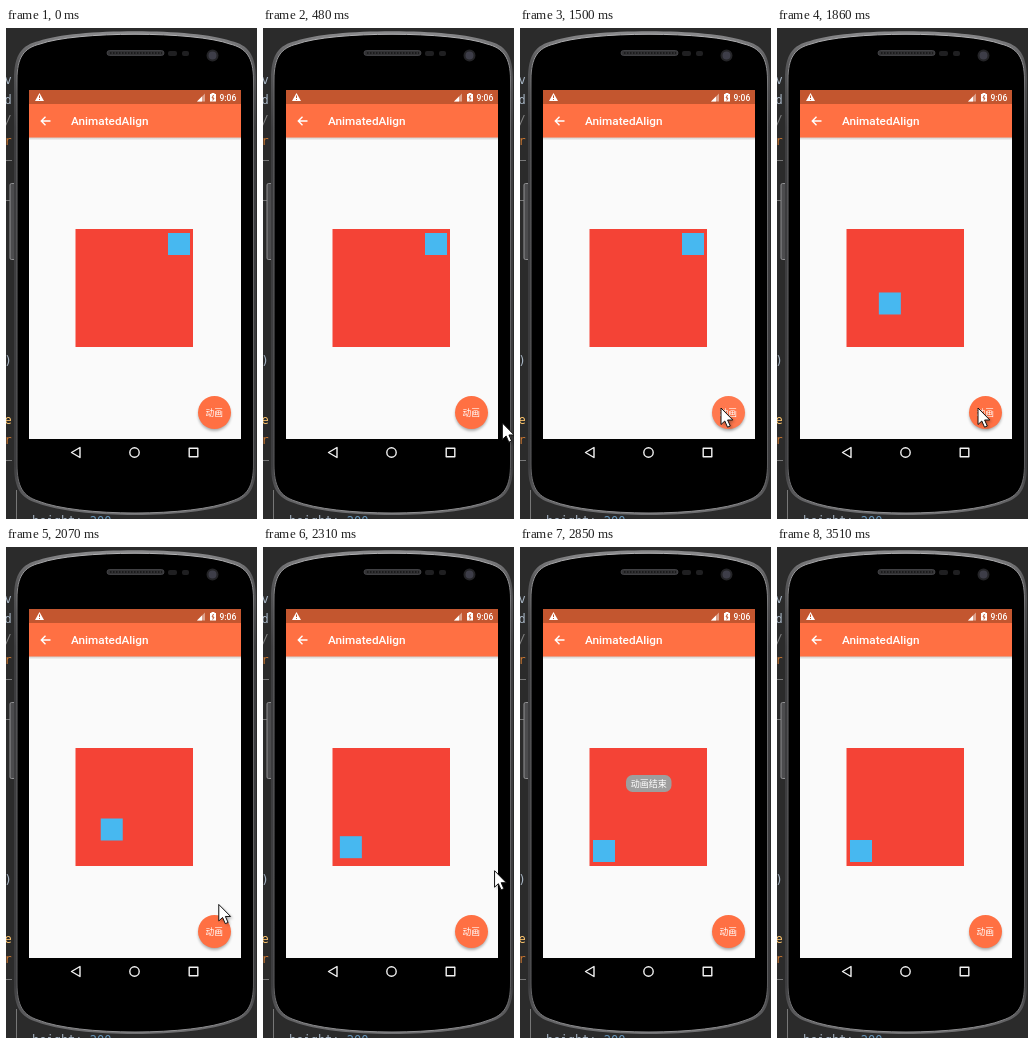
Recreate the animation shown at these times as an HTML page. Size 251 by 491 pixels, loop 3750 ms.

```html
<!DOCTYPE html>
<html lang="zh">
<head>
<meta charset="utf-8">
<title>AnimatedAlign</title>
<style>
  html, body { margin: 0; height: 100%; overflow: hidden; background: #2b2b2b; }
  svg { display: block; width: 100vw; height: 100vh; }
  .code { font: 12px "DejaVu Sans Mono", monospace; }
  .ui { font-family: Roboto, sans-serif; fill: #fff; }
  .cjk { font-family: "Noto Sans CJK SC", "Noto Sans CJK", sans-serif; fill: #fff; text-anchor: middle; }
</style>
</head>
<body>
<svg viewBox="0 0 251 491">
  <defs>
    <linearGradient id="rim" x2="0" y2="1">
      <stop stop-color="#8c8c8e"/><stop offset=".06" stop-color="#58585a"/>
      <stop offset=".2" stop-color="#3c3c3e"/><stop offset=".9" stop-color="#3c3c3e"/>
      <stop offset="1" stop-color="#707072"/>
    </linearGradient>
    <linearGradient id="edge" x2="0" y2="1">
      <stop stop-color="#b4b4b6"/><stop offset=".12" stop-color="#6c6c6e"/>
      <stop offset=".9" stop-color="#5c5c5e"/><stop offset="1" stop-color="#909092"/>
    </linearGradient>
    <linearGradient id="shade" x2="0" y2="1">
      <stop stop-opacity=".2"/><stop offset="1" stop-opacity="0"/>
    </linearGradient>
    <filter id="soft" x="-50%" y="-50%" width="200%" height="200%"><feGaussianBlur stdDeviation="1.5"/></filter>
  </defs>

  <!-- editor behind the phone -->
  <rect width="251" height="491" fill="#2b2b2b"/>
  <g class="code" fill="#a9b7c6">
    <text x="-1.500" y="56">v</text><text x="-1.500" y="76">d</text>
    <text x="-1.500" y="96" fill="#808080">/</text>
    <text x="-1.500" y="117" fill="#cc7832">r</text>
    <text x="-1.500" y="337">)</text>
    <text x="-1.500" y="396" fill="#ffc66d">e</text>
    <text x="-1.500" y="416" fill="#cc7832">r</text>
    <text x="26" y="496.500">height: <tspan fill="#6897bb">200</tspan></text>
  </g>
  <path d="M0 132.500H6M0 172.500H6M0 432.500H6M10.500 462V491" stroke="#777" fill="none"/>

  <!-- phone -->
  <rect x="4" y="155.500" width="6" height="76" rx="1.500" fill="#4c4c4e" stroke="#909092"/>
  <path d="M8 52C8 26 16 17 33 13C70 0 188 0 225 13C242 17 250 26 250 52V436C250 461 243 470 227 475C186 491 72 491 31 475C15 470 8 461 8 436Z" fill="url(#rim)"/>
  <path d="M11 52C11 29 18 20 34 16C70 3 188 3 224 16C240 20 247.500 29 247.500 52V436C247.500 459 241 468 226 473C186 489 72 489 32 473C17 468 11 459 11 436Z" fill="#000" stroke="url(#edge)"/>
  <rect x="101" y="22.500" width="57" height="5" rx="2.500" fill="#323234" stroke="#505053" stroke-width=".7"/>
  <path d="M104 25H156" stroke="#151515" stroke-width="1.500" stroke-dasharray="1.500 1.500"/>
  <rect x="162" y="23" width="9" height="5" rx="2" fill="#1f1f21"/>
  <rect x="176" y="23" width="7" height="5" rx="2" fill="#1f1f21"/>
  <circle cx="206.500" cy="27.500" r="5" fill="#3d3d48" stroke="#242427" stroke-width="2"/>

  <!-- screen -->
  <rect x="23" y="62" width="212" height="374" fill="#000"/>
  <rect x="23" y="76" width="212" height="335" fill="#fafafa"/>
  <rect x="23" y="109" width="212" height="3.500" fill="url(#shade)"/>
  <rect x="23" y="62" width="212" height="14.500" fill="#c3562f"/>
  <rect x="23" y="76" width="212" height="33.500" fill="#ff7043"/>
  <path d="M33.500 65L38 73H29Z" fill="#fff"/>
  <path d="M33.500 67.500V70M33.500 71V72" stroke="#c3562f"/>
  <path d="M191 73.500L199 65.500V73.500Z" fill="#fff" opacity=".45"/>
  <path d="M191 73.500L196 68.500V73.500Z" fill="#fff"/>
  <path d="M204 66H205.500V65H208.500V66H210V73.500H204Z" fill="#fff"/>
  <path d="M207.500 67L206 70H208L206.700 72.500" stroke="#c3562f" fill="none"/>
  <text class="ui" x="213.500" y="72.500" font-size="8.500" font-weight="500">9:06</text>
  <path d="M44.500 93H35.500M39.500 88.800L35.300 93L39.500 97.200" stroke="#fff" stroke-width="1.400" fill="none"/>
  <text class="ui" x="65" y="97.300" font-size="11.750" font-weight="500">AnimatedAlign</text>
  <g stroke="#f2f2f2" stroke-width="1.400" fill="none" stroke-linejoin="round">
    <path d="M74 419.500V429.500L65.500 424.500Z"/>
    <circle cx="128.500" cy="424.500" r="4.700"/>
    <rect x="183.200" y="420.200" width="8.600" height="8.600"/>
  </g>

  <rect x="69.500" y="201" width="117.500" height="118" fill="#f44336"/>
  <rect id="mark" x="-11" y="-11" width="22" height="22" fill="#47b8f0"/>

  <g id="toast">
    <rect x="106" y="228" width="45.500" height="17" rx="6.500" fill="#9e9e9e"/>
    <text class="cjk" x="128.700" y="239.800" font-size="9">动画结束</text>
  </g>

  <circle cx="208.500" cy="386.700" r="16" opacity=".34" filter="url(#soft)"/>
  <circle cx="208.500" cy="384.500" r="16.500" fill="#ff7043"/>
  <circle id="press" cx="208.500" cy="384.500" r="16.500" fill="#fff"/>
  <text class="cjk" x="208.200" y="387.700" font-size="8.700" font-weight="500">动画</text>

  <g id="cursor">
    <path d="M2 2V18L6 15L9 21L11 20L9 14H14Z" opacity=".3" filter="url(#soft)"/>
    <path d="M0 0V16.500L3.800 13L6.500 19.200L9.300 18L6.600 12H11.800Z" fill="#fff" stroke="#111"/>
  </g>
</svg>
<script>
const LOOP = 3750;
const [mark, toast, press, cursor] =
  ["mark", "toast", "press", "cursor"].map(id => document.getElementById(id));

// time, x, y of the pointer tip
const path = [
  [390, 253, 398], [510, 235, 394], [660, 212, 383], [810, 201, 380],
  [1920, 201, 380], [2010, 208, 366], [2310, 231.5, 324], [2550, 246, 251], [2580, 256, 246]
];

const ramp = (t, from, to) => Math.min(1, Math.max(0, (t - from) / (to - from)));
const place = (el, x, y) => el.setAttribute("transform", `translate(${x} ${y})`);

function bounceOut(t) {
  const k = 7.5625;
  if (t < 1 / 2.75) return k * t * t;
  if (t < 2 / 2.75) return k * (t - 1.5 / 2.75) ** 2 + 0.75;
  if (t < 2.5 / 2.75) return k * (t - 2.25 / 2.75) ** 2 + 0.9375;
  return k * (t - 2.625 / 2.75) ** 2 + 0.984375;
}

function pointerAt(t) {
  const i = path.findIndex(p => p[0] > t);
  if (i < 1) return [300, 300];
  const [a, b] = [path[i - 1], path[i]];
  const u = ramp(t, a[0], b[0]);
  return [1, 2].map(k => a[k] + (b[k] - a[k]) * u);
}

function draw(t) {
  const p = bounceOut(ramp(t, 1574, 2534));
  place(mark, 173 - 89 * p, 216 + 88 * p);
  place(cursor, ...pointerAt(t));
  press.setAttribute("opacity", t < 1500 ? 0 : 0.06 * (1 - ramp(t, 1620, 1860)));
  toast.setAttribute("opacity", ramp(t, 2560, 2840) * (1 - ramp(t, 3340, 3510)));
}

const start = performance.now();
function tick() {
  draw((performance.now() - start) % LOOP);
  requestAnimationFrame(tick);
}
tick();
</script>
</body>
</html>
```
